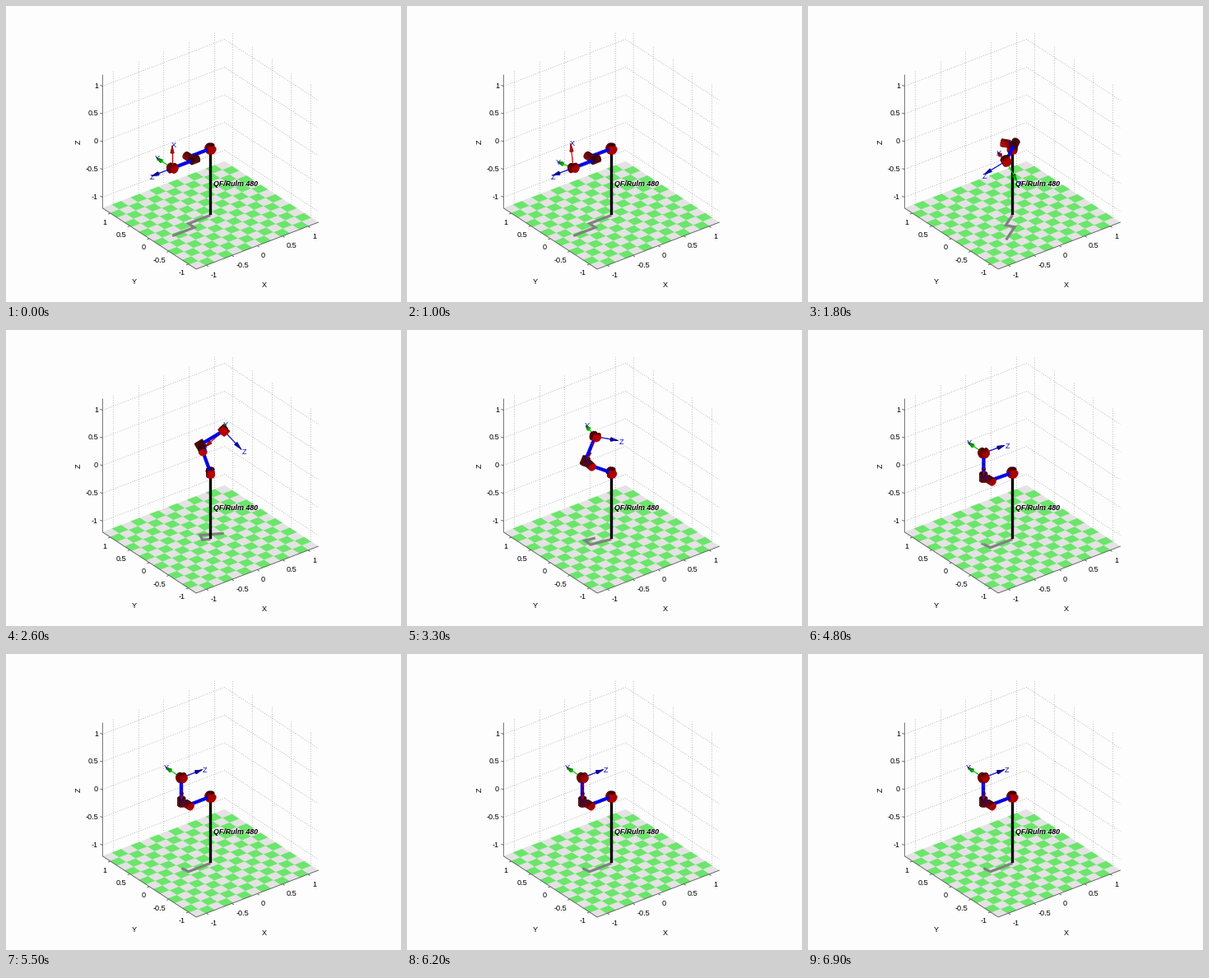
A matplotlib script for the animation above (7 s loop, 480 by 360 pixels).

```python
import numpy as np
import matplotlib.pyplot as plt
from matplotlib.animation import FuncAnimation
from matplotlib.collections import LineCollection, PolyCollection

W, H, DPI = 480, 360, 100
PT = 72 / DPI
FRAMES, STEP = 70, 100
LIM = 1.2
TICKS = (-1, -0.5, 0, 0.5, 1)

plt.rcParams["font.family"] = "Liberation Sans"

# Orthographic camera, azimuth -37.5, elevation 30
AZ, EL = np.radians([-37.5, 30])
SCALE, CENTRE = 77.9, np.array([248.4, 173.5])
RIGHT = np.array([np.cos(AZ), np.sin(AZ), 0])
TOWARD = np.array([np.sin(AZ) * np.cos(EL), -np.cos(AZ) * np.cos(EL), np.sin(EL)])
UP = np.cross(TOWARD, RIGHT)
CAMERA = SCALE * np.array([RIGHT, -UP]).T

LIGHT = np.array([-0.5, -0.85, 0.1])
LIGHT /= np.linalg.norm(LIGHT)

RED, GREEN, BLUE = np.eye(3)

# Arm geometry: d, a, alpha per joint
LINKS = [(0, 0, 90), (0, 0.4318, 0), (0.15005, 0.0203, -90),
         (0.4318, 0, 90), (0, 0, -90), (0, 0, 0)]

# Joint angles in degrees at key times in seconds
TIMES = np.array([0, 1.0, 1.8, 2.6, 4.1, 5.5, 7.0])
JOINTS = np.array([
    [0, 0, 34, 151, 179, 180, 180],
    [180, 179.5, 140, 73, 5, 0, 0],
    [-90, -89.5, -40, -14, -3, 0, 0],
    [0, 11, 112, 162, 179, 180, 180],
    [0, -1, -48, -80, -90, -90, -90],
    [0, 0, 3, 0, 0, 0, 0],
], float)


def project(p):
    return np.asarray(p, float) @ CAMERA + CENTRE


def slopes(values):
    """Slopes for a monotone cubic through the key values."""
    d = np.diff(values) / np.diff(TIMES)
    m = np.zeros(len(values))
    for i in range(1, len(d)):
        if d[i - 1] * d[i] > 0:
            m[i] = 2 * d[i - 1] * d[i] / (d[i - 1] + d[i])
    return m


SLOPES = np.array([slopes(row) for row in JOINTS])


def pose(t):
    i = min(np.searchsorted(TIMES, t, side="right") - 1, len(TIMES) - 2)
    h = TIMES[i + 1] - TIMES[i]
    u = (t - TIMES[i]) / h
    ease = u * u * (3 - 2 * u)
    return (JOINTS[:, i] * (1 - ease) + JOINTS[:, i + 1] * ease
            + SLOPES[:, i] * h * u * (1 - u) ** 2
            - SLOPES[:, i + 1] * h * u * u * (1 - u))


def link_matrix(theta, d, a, alpha):
    c, s = np.cos(np.radians(theta)), np.sin(np.radians(theta))
    ca, sa = np.cos(np.radians(alpha)), np.sin(np.radians(alpha))
    return np.array([[c, -s * ca, s * sa, a * c],
                     [s, c * ca, -c * sa, a * s],
                     [0, sa, ca, d],
                     [0, 0, 0, 1]])


def chain(q):
    frames = [np.eye(4)]
    for theta, link in zip(q, LINKS):
        frames.append(frames[-1] @ link_matrix(theta, *link))
    return frames


class Scene:
    """Collects shaded faces and paints them from back to front."""

    def __init__(self):
        self.items = []

    def face(self, pts, normal, color, ambient, diffuse):
        if normal @ TOWARD <= 0:
            return
        shade = ambient + diffuse * abs(normal @ LIGHT)
        depth = np.mean(pts, axis=0) @ TOWARD
        self.items.append((depth, project(pts), tuple(np.clip(color * shade, 0, 1))))

    def frustum(self, start, end, r0, r1, color, ambient=0.17, diffuse=0.55, n=16):
        start, end = np.asarray(start), np.asarray(end)
        axis = (end - start) / np.linalg.norm(end - start)
        side = np.cross(axis, np.eye(3)[np.argmin(np.abs(axis))])
        side /= np.linalg.norm(side)
        other = np.cross(axis, side)
        a = np.linspace(0, 2 * np.pi, n + 1)[:, None]
        ring = np.cos(a) * side + np.sin(a) * other
        low, high = start + r0 * ring, end + r1 * ring
        for i in range(n):
            normal = ring[i] + ring[i + 1]
            normal = normal / np.linalg.norm(normal)
            quad = np.array([low[i], low[i + 1], high[i + 1], high[i]])
            self.face(quad, normal, color, ambient, diffuse)
        self.face(low[:-1], -axis, color, ambient, diffuse)
        if r1 > 0:
            self.face(high[:-1], axis, color, ambient, diffuse)

    def bar(self, start, end, width, color, pieces=8):
        a, b = project(start), project(end)
        size = np.hypot(*(b - a))
        if size < 0.1:
            return
        off = np.array([a[1] - b[1], b[0] - a[0]]) / size * width / 2
        pts = np.linspace(start, end, pieces + 1)
        for p, r in zip(pts[:-1], pts[1:]):
            s, e = project(p), project(r)
            quad = np.array([s + off, e + off, e - off, s - off])
            self.items.append(((p + r) / 2 @ TOWARD, quad, tuple(color)))

    def paint(self, coll):
        self.items.sort(key=lambda item: item[0])
        coll.set_verts([item[1] for item in self.items])
        colors = [item[2] for item in self.items]
        coll.set_facecolor(colors)
        coll.set_edgecolor(colors)


fig = plt.figure(figsize=(W / DPI, H / DPI), dpi=DPI, facecolor="#fdfdfd")
ax = fig.add_axes([0, 0, 1, 1])
ax.set_xlim(0, W)
ax.set_ylim(H, 0)
ax.axis("off")


def label(x, y, text, px=9.2, **kw):
    kw.setdefault("ha", "center")
    kw.setdefault("va", "center")
    return ax.text(x, y, text, fontsize=px * PT, **kw)


def draw_grid():
    lines = []
    for v in TICKS:
        lines += [[(v, LIM, -LIM), (v, LIM, LIM)],
                  [(LIM, v, -LIM), (LIM, v, LIM)],
                  [(-LIM, LIM, v), (LIM, LIM, v), (LIM, -LIM, v)]]
    ax.add_collection(LineCollection([project(s) for s in lines], colors="#808080",
                                     linewidths=0.5, linestyles=[(0, (1, 3))], zorder=1))


def draw_floor():
    n = 13
    e = np.linspace(-LIM, LIM, n + 1)
    tiles, colors = [], []
    for i in range(n):
        for j in range(n):
            x0, x1, y0, y1 = e[i], e[i + 1], e[j], e[j + 1]
            corners = [(x0, y0, -LIM), (x1, y0, -LIM), (x1, y1, -LIM), (x0, y1, -LIM)]
            tiles.append(project(corners))
            colors.append("#6be56b" if (i + j) % 2 else "#e4e2e3")
    ax.add_collection(PolyCollection(tiles, facecolors=colors, edgecolors=colors,
                                     linewidths=0.2, zorder=2))


def draw_axes():
    edge = project([(LIM, -LIM, -LIM), (-LIM, -LIM, -LIM),
                    (-LIM, LIM, -LIM), (-LIM, LIM, LIM)])
    ax.plot(*edge.T, color="#555555", lw=0.6, zorder=3)
    marks = []
    for v in TICKS:
        px = project((v, -LIM, -LIM))
        py = project((-LIM, v, -LIM))
        pz = project((-LIM, LIM, v))
        marks += [[px, px + (2.5, 1.6)], [py, py + (-2.8, 1.1)], [pz, pz + (-3, -1)]]
        text = f"{v:g}"
        label(px[0] + 4.8, px[1] + 12.3, text, ha="left")
        label(py[0] - 4, py[1] + 11, text, ha="right")
        label(112, pz[1] - 0.3, text, ha="right")
    ax.add_collection(LineCollection(marks, colors="#555555", linewidths=0.6, zorder=3))
    label(313.5, 339, "X")
    label(156, 335, "Y")
    label(88.5, 165.5, "Z", rotation=90)


draw_grid()
draw_floor()
draw_axes()
label(252.5, 219, "QF/Rulm 480", 8.9, ha="left", va="baseline",
      weight="bold", style="italic", zorder=5)

shadow, = ax.plot([], [], color="#808080", lw=3.2 * PT, zorder=4,
                  solid_capstyle="butt", solid_joinstyle="miter")
arm = PolyCollection([], linewidths=0.25, zorder=6)
ax.add_collection(arm)
tags = [label(0, 0, name, color="#1010c0", zorder=7) for name in "XYZ"]

ORIGIN = np.zeros(3)
FOOT = np.array([0, 0, -LIM])
RADIUS, HALF = 0.062, 0.068
ARROW, HEAD = 0.41, 0.13


def update(k):
    frames = chain(pose(k * STEP / 1000))
    points = [f[:3, 3] for f in frames]
    scene = Scene()

    scene.bar(FOOT, ORIGIN, 2.3, (0, 0, 0), 12)
    for a, b in zip(points[:-1], points[1:]):
        scene.bar(a, b, 3.8, (0, 0, 0.87))
    for j, f in enumerate(frames[:-1]):
        p, z = f[:3, 3], f[:3, 2]
        diffuse = 0.15 if j == 3 else 0.55
        scene.frustum(p - HALF * z, p + HALF * z, RADIUS, RADIUS, RED, diffuse=diffuse)

    tip = frames[-1]
    hand = tip[:3, 3]
    for i, color in enumerate((RED, GREEN, BLUE)):
        axis = tip[:3, i]
        neck, end = hand + (ARROW - HEAD) * axis, hand + ARROW * axis
        scene.bar(hand, neck, 0.8, color * 0.8)
        scene.frustum(neck, end, 0.03, 0, color, ambient=0.35, diffuse=0.35, n=10)
        tags[i].set_position(project(hand + 0.43 * axis) + (2, 1.5))

    scene.paint(arm)
    ground = project([(p[0], p[1], -LIM) for p in points])
    shadow.set_data(*ground.T)
    return [arm, shadow, *tags]


anim = FuncAnimation(fig, update, frames=FRAMES, interval=STEP,
                     repeat=True, repeat_delay=0, blit=False)
plt.show()
```
